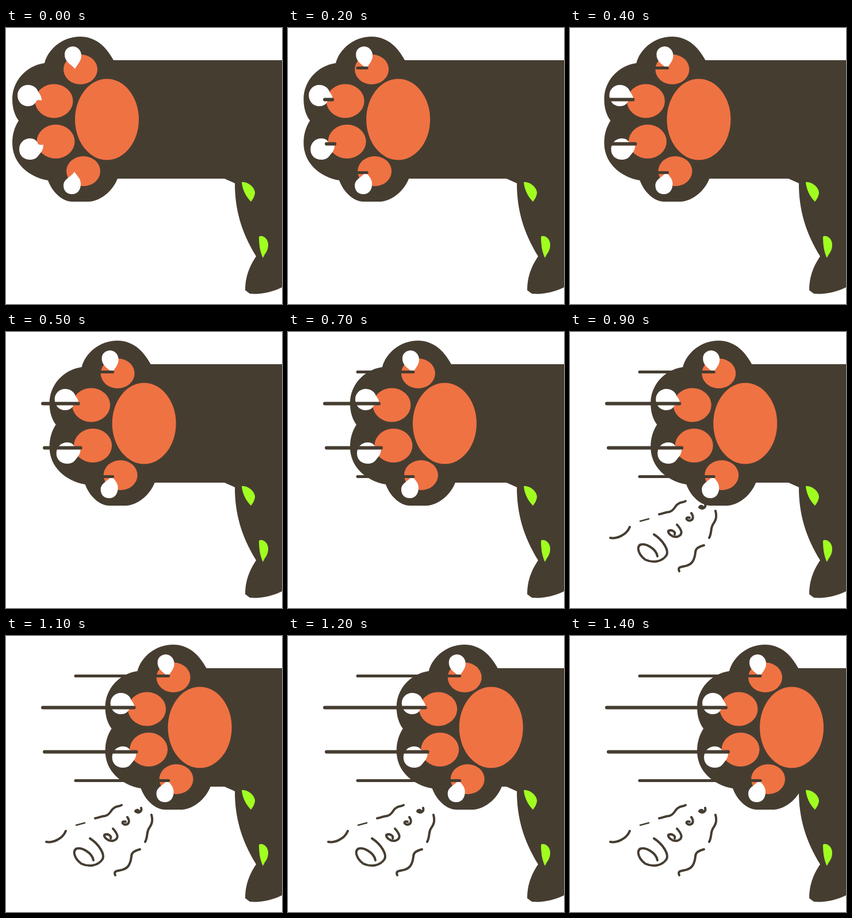
Animation of 480x480 px, one loop 1.7 s. Source, as an HTML page:

```html
<!DOCTYPE html>
<html lang="en">
<head>
<meta charset="utf-8">
<title>Scratching paw</title>
<style>
  html, body { margin: 0; width: 100%; height: 100%; overflow: hidden; background: #fff; }
  svg { display: block; width: 100%; height: 100%; }
  .fur { fill: #463d31; }
  .pad { fill: #ef7243; }
  .claw { fill: #fff; }
  .leaf { fill: #a0ff20; }
  .ink { fill: none; stroke: #463d31; stroke-width: 4; stroke-linecap: round; stroke-linejoin: round; }
</style>
</head>
<body>
<svg viewBox="0 0 480 480">
  <path class="fur" d="M370 262H380L398 270C398 315 409 355 435 397C422 416 416 435 416 456L424 462C445 464 463 459 480 451V250H370Z"/>
  <g class="leaf">
    <path d="M410 268C422 267 433 278 433 287C432 294 429 298 426 302C417 293 411 281 410 268Z"/>
    <path d="M440 363C444 359 456 364 456 377C456 389 449 393 447 400C442 390 440 378 440 363Z"/>
  </g>
  <g id="paw">
    <path class="fur" d="M480 56H187C177 38 160 15 129 15C98 15 73 37 67 61C34 66 11 93 11 124C11 139 15 152 22 161C14 174 11 186 11 200C11 234 38 259 73 265C80 285 98 302 115 302H145C167 300 186 282 194 262H480Z"/>
    <g class="pad">
      <ellipse cx="129.5" cy="72" rx="29.5" ry="26"/>
      <ellipse cx="83.5" cy="127" rx="33" ry="29.5"/>
      <ellipse cx="86.5" cy="197.5" rx="33" ry="29.5"/>
      <ellipse cx="134.5" cy="249" rx="29.5" ry="26"/>
      <ellipse cx="175.5" cy="159" rx="55.5" ry="70.5"/>
    </g>
    <g class="claw">
      <path d="M120 71C113 63 102 59 102 46C102 37 109 32 117 32C126 33 131 40 131 48C131 58 124 63 120 71Z"/>
      <path d="M62 126C58 125 54 125 53 127C50 133 45 136 38 136C28 136 20 128 20 117C20 107 28 99 38 99C48 99 54 105 56 111C59 115 62 119 62 126Z"/>
      <path d="M65 203C65 213 60 217 57 221C53 227 48 229 42 229C31 229 23 222 23 211C23 200 31 192 42 192C49 192 54 196 56 202C59 204 62 203 65 203Z"/>
      <path d="M119 250C123 257 130 261 130 271C130 282 124 289 115 289C106 289 100 283 100 274C100 262 114 259 119 250Z"/>
    </g>
  </g>
  <g id="scratches" class="ink"></g>
  <g id="doodle" class="ink">
    <path d="M70 358C80 360 98 354 104 339"/>
    <path stroke-width="2.5" d="M122 329L137 325"/>
    <path d="M155 317C163 316 166 313 172 313C182 311 182 302 188 299C193 295 197 297 201 294"/>
    <path d="M146 352C163 363 172 380 168 388C160 400 144 402 131 396C120 388 115 375 122 370C132 367 150 377 152 390"/>
    <path d="M186 335C195 345 197 352 187 356C178 358 170 350 171 346C176 343 184 347 182 352"/>
    <path d="M211 315C216 322 214 328 207 328C200 326 202 321 208 323"/>
    <path d="M235 299C237 306 230 309 225 305C226 302 229 302 231 304"/>
    <path d="M253 311C256 323 253 328 249 334C244 341 247 349 242 358"/>
    <path d="M233 371C222 374 218 377 218 384C216 400 210 404 204 406C196 409 186 407 190 416"/>
  </g>
</svg>
<script>
const paw = document.getElementById("paw");
const scratches = document.getElementById("scratches");
const doodle = document.getElementById("doodle");

// start x, y, end x before the paw moves, width
const lines = [[121, 69.5, 121, 5], [64, 124.5, 61, 6], [67, 201.5, 65, 6], [121, 251.5, 121, 5]]
  .map(([x, y, end, width]) => {
    const el = document.createElementNS("http://www.w3.org/2000/svg", "path");
    el.setAttribute("stroke-width", width);
    el.style.strokeWidth = width;
    scratches.append(el);
    return { el, x, y, end };
  });

function draw(now) {
  const t = now % 1700;
  const step = Math.min(13, Math.max(0, Math.floor(t / 100) - 1));
  const shift = step * 16.16;
  paw.setAttribute("transform", `translate(${shift} 0)`);
  for (const { el, x, y, end } of lines) el.setAttribute("d", `M${x} ${y}H${end + shift}`);
  scratches.style.display = step > 0 ? "" : "none";
  doodle.style.display = step > 6 ? "" : "none";
}

let start;
function tick(now) {
  start ??= now;
  draw(now - start);
  requestAnimationFrame(tick);
}
draw(0);
requestAnimationFrame(tick);
</script>
</body>
</html>
```
